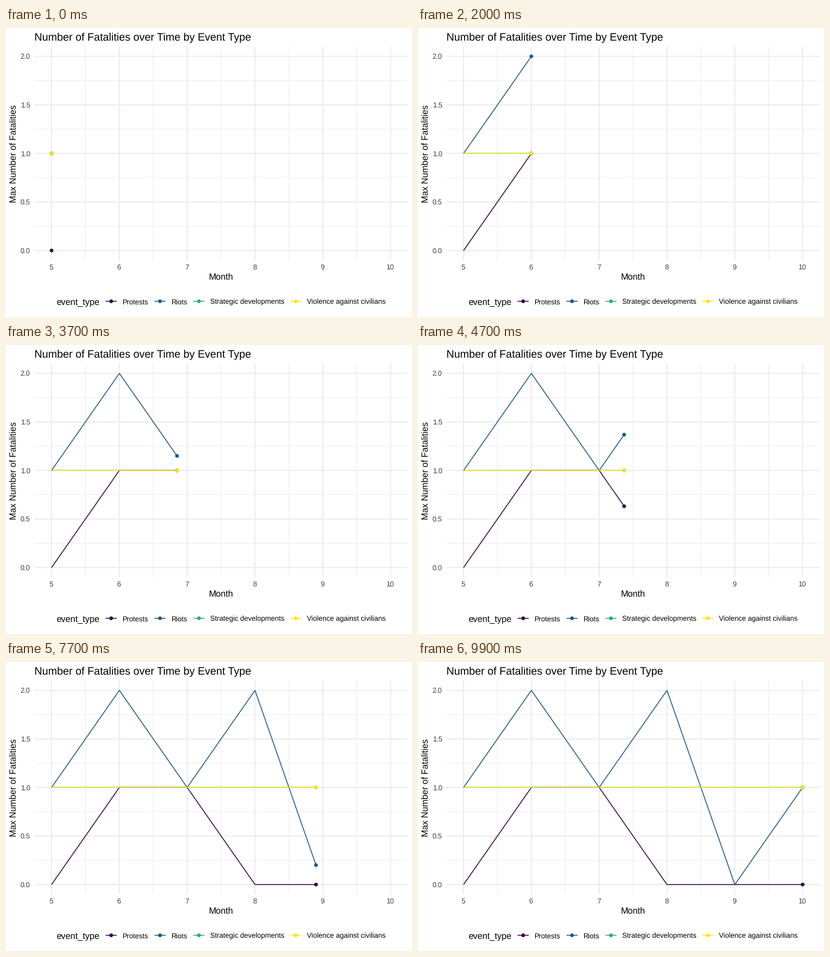
Write a matplotlib script that moves like this. It is 672 px wide and 480 px high and loops after 10000 ms.

```python
import numpy as np
import matplotlib.pyplot as plt
from matplotlib.animation import FuncAnimation
from matplotlib.patches import Circle

W, H, DPI = 672, 480, 96
LINE = 1.42 * 72 / DPI
RADIUS = 3.07
GRID, TICK = "#e7e7e7", "#3f3f3f"
LEFT, RIGHT, TOP, BOTTOM = 47.3, 664.7, 31.0, 385.6
KEY_Y = 453.9

plt.rcParams.update({
    "font.family": "Liberation Sans",
    "text.hinting": "none",
    "lines.solid_capstyle": "butt",
    "lines.solid_joinstyle": "round",
})

MONTHS = np.arange(5, 11)
KEYS = [0, 20, 40, 59, 79, 99]  # frame at which each month is reached
SERIES = [
    # name, colour, monthly values, legend key centre
    ("Protests", "#330042", [0, 1, 1, 0, 0, 0], 174.1),
    ("Riots", "#22557d", [1, 2, 1, 2, 0, 1], 254.9),
    ("Strategic developments", "#2bad68", [1] * 6, 319.4),
    ("Violence against civilians", "#fde41c", [1] * 6, 479.6),
]


def px(month):
    return 75.4 + 112.24 * (np.asarray(month) - 5)


def py(value):
    return 369.6 - 161.25 * np.asarray(value)


fig = plt.figure(figsize=(W / DPI, H / DPI), dpi=DPI, facecolor="white")
ax = fig.add_axes([0, 0, 1, 1])
ax.set(xlim=(0, W), ylim=(H, 0))
ax.axis("off")


def stroke(xs, ys, color, width=LINE, z=3):
    return ax.plot(xs, ys, color=color, lw=width, zorder=z, snap=False)[0]


def dot(x, y, color):
    # A patch keeps its sub-pixel centre, unlike a line marker
    return ax.add_patch(Circle((x, y), RADIUS, fc=color, lw=0,
                               zorder=5, snap=False))


def label(x, y, s, size, color="black", **kw):
    ax.text(x, y, s, fontsize=size, color=color, va="baseline", **kw)


def grid(months, values, width, z):
    for v in values:
        stroke([LEFT, RIGHT], [py(v)] * 2, GRID, width, z)
    for m in months:
        stroke([px(m)] * 2, [TOP, BOTTOM], GRID, width, z)


grid(np.arange(5.5, 10), np.arange(0.25, 2, 0.5), LINE / 2, 1)
grid(MONTHS, np.arange(0, 2.1, 0.5), LINE, 2)

label(47.3, 20, "Number of Fatalities over Time by Event Type", 13.28)
for m in MONTHS:
    label(px(m) - 0.5, 401, str(m), 8.8, TICK, ha="center")
for v in np.arange(0, 2.1, 0.5):
    label(40.2, py(v) + 4.2, f"{v:.1f}", 8.8, TICK, ha="right")
label(356, 418.6, "Month", 11, ha="center")
label(18, 208.3, "Max Number of Fatalities", 11, rotation=90,
      rotation_mode="anchor", ha="center")

label(83.5, 460, "event_type", 11)
for name, color, _, cx in SERIES:
    stroke([cx - 9.2, cx + 9.2], [KEY_Y] * 2, color)
    dot(cx, KEY_Y, color)
    label(cx + 18.4, 459, name, 8.8)

lines = [stroke([], [], s[1], z=4) for s in SERIES]
heads = [dot(px(5), py(s[2][0]), s[1]) for s in SERIES]


def update(i):
    now = np.interp(i, KEYS, MONTHS)
    past = MONTHS < now
    months = np.append(MONTHS[past], now)
    for (_, _, values, _), line, head in zip(SERIES, lines, heads):
        ys = np.append(np.array(values)[past], np.interp(now, MONTHS, values))
        line.set_data(px(months), py(ys))
        head.center = px(now), py(ys[-1])
    return lines + heads


anim = FuncAnimation(fig, update, frames=100, interval=100,
                     repeat=True, repeat_delay=0, blit=False)
plt.show()
```
